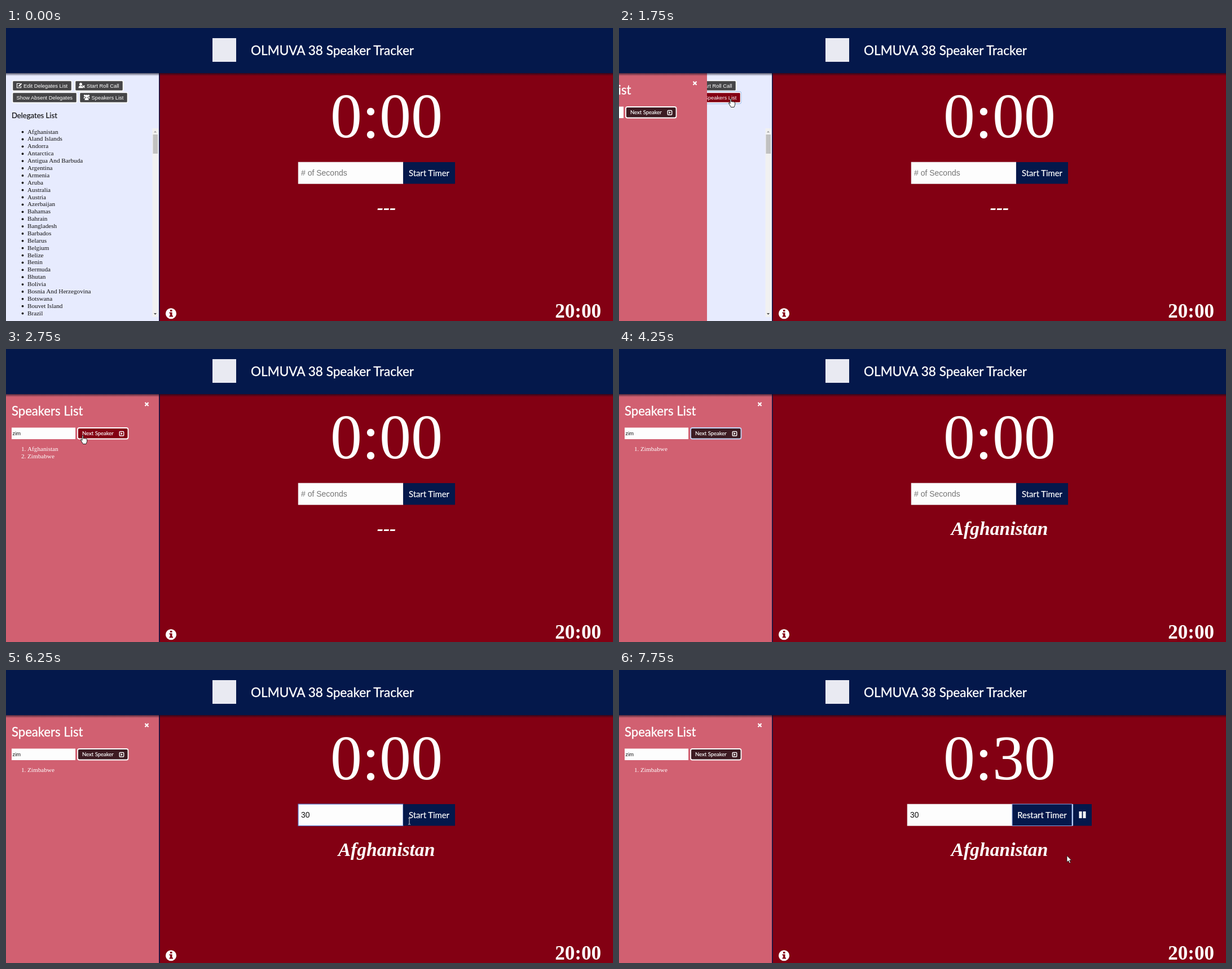
An HTML page that plays this animation: 1076 px wide and 520 px high, repeating every 8 s.

```html
<!DOCTYPE html>
<html lang="en">
<head>
<meta charset="utf-8">
<title>Speaker Tracker</title>
<style>
  html, body { margin: 0; width: 100%; height: 100%; overflow: hidden; background: #830013; }
  svg { display: block; width: 1076px; height: 520px; }
  text { white-space: pre; }
  .head { font-family: Lato, sans-serif; stroke-width: .015em; }
  .white { fill: #fff; stroke: #fff; }
  .dark { fill: #111; stroke: #111; }
  .ui { font: 9.4px "Liberation Sans", Arial, sans-serif; }
  .field { font: 14px "Liberation Sans", Arial, sans-serif; }
  .list { font: 11.2px "Liberation Serif", Times, serif; }
  .clock { font: 112px "Liberation Serif", Times, serif; fill: #fff; }
  .total { font: bold 35px "Liberation Serif", Times, serif; fill: #fff; }
  .name { font: italic bold 33.6px "Liberation Serif", Times, serif; fill: #fff; }
  .btn { fill: #454547; stroke: #fff; stroke-width: 1.5px; }
  .hot { fill: #830013; }
  .mid { text-anchor: middle; }
  .end { text-anchor: end; }
  .icon { fill: #fff; stroke: none; }
  .line { fill: none; stroke: #fff; }
</style>
</head>
<body>
<svg viewBox="0 0 1076 520" xmlns="http://www.w3.org/2000/svg">
  <defs>
    <linearGradient id="shade" x2="0" y2="1">
      <stop offset="0" stop-color="#0a0a20" stop-opacity=".65"/>
      <stop offset="1" stop-color="#0a0a20" stop-opacity="0"/>
    </linearGradient>
    <clipPath id="side"><path d="M0 80H271V520H0z"/></clipPath>
  </defs>

  <rect width="1076" height="520" fill="#830013"/>

  <!-- timer -->
  <text id="clock" class="clock mid" x="674.5" y="194">0:00</text>
  <g id="form">
    <rect id="field" x="518" y="238" width="186" height="38.5" fill="#fdfdfd"/>
    <text id="seconds" class="field" x="523" y="262"></text>
    <rect id="start" x="704" y="238" width="92" height="38.5" fill="#04184b"/>
    <text id="startText" class="head white mid" font-size="14.8" x="750" y="262.5">Start Timer</text>
    <g id="pause">
      <rect x="812" y="238" width="33" height="38.5" fill="#04184b"/>
      <path d="M811 238V276.5" stroke="#b9cdf2" stroke-width="2"/>
      <path class="icon" d="M822.5 251h5v12h-5zM829.5 251h5v12h-5z"/>
    </g>
  </g>
  <text id="speaker" class="name mid" x="674.5" y="329.5">---</text>
  <text class="total end" x="1055" y="514">20:00</text>
  <circle cx="292.5" cy="506.8" r="9.5" fill="#fff"/>
  <path fill="#830013" d="M291 500h3.5v3h-3.5zM289.5 504.5h5v6h1.5v2h-6.5v-2h1.5v-4h-1.5z"/>

  <!-- delegates -->
  <rect y="80" width="271" height="440" fill="#e7ebfe"/>
  <g class="ui" fill="#fff">
    <rect class="btn" x="11.5" y="93.5" width="105" height="18" rx="2"/>
    <text x="31" y="105.5">Edit Delegates List</text>
    <path class="line" stroke-width="1.2" d="M25 98.5h-5.5v7.5h7v-3"/>
    <path class="line" stroke-width="2" d="M22.5 103.5l5-5"/>
    <rect class="btn" x="122.5" y="93.5" width="85" height="18" rx="2"/>
    <text x="143" y="105.5">Start Roll Call</text>
    <path class="icon" d="M128.5 106.5q0-4 3.5-4t4.5 4z"/>
    <circle cx="132.5" cy="99.8" r="2.5"/>
    <path class="line" stroke-width="1.5" d="M135.5 102l4 4m0-4l-4 4"/>
    <rect class="btn" x="11.5" y="114.5" width="114" height="18" rx="2"/>
    <text x="18.5" y="126.5">Show Absent Delegates</text>
    <rect id="openFocus" x="129.7" y="112.8" width="87" height="21.5" rx="3" fill="none" stroke="#8fb4e6"/>
    <rect id="open" class="btn" x="130.5" y="114.5" width="85" height="18" rx="2"/>
    <text x="151.5" y="126.5">Speakers List</text>
    <g class="icon">
      <circle cx="143" cy="121" r="2.5"/><circle cx="139.5" cy="120" r="1.7"/><circle cx="146.5" cy="120" r="1.7"/>
      <path d="M139.5 128q0-4.500 3.500-4.500t3.500 4.500zM137.500 125q0-3 3-3l-1 3zM148.500 125q0-3-3-3l1 3z"/>
    </g>
  </g>
  <text class="head dark" font-size="13.1" x="10" y="160">Delegates List</text>
  <g id="delegates" class="list" fill="#111"></g>
  <rect x="259.5" y="178" width="10.5" height="335" fill="#f1f1f1"/>
  <rect x="260.5" y="189" width="8.5" height="34" fill="#c1c1c1"/>
  <path fill="#a3a3a3" d="M262 185.500h5l-2.500-3z"/>
  <path fill="#505050" d="M262 506h5l-2.500 3z"/>

  <!-- speakers -->
  <g clip-path="url(#side)">
    <g id="panel">
      <rect y="80" width="271" height="440" fill="#d16071"/>
      <text class="head white" font-size="22.1" x="10" y="118">Speakers List</text>
      <path class="line" stroke-width="2.2" d="M246.5 95l6 6m0-6l-6 6"/>
      <rect x="10" y="139.5" width="113" height="20.5" fill="#fdfdfd"/>
      <text id="query" class="ui" x="11.5" y="152.8" fill="#111"></text>
      <rect id="next" x="127" y="140" width="89.5" height="19.5" rx="3" stroke-width="1.8"/>
      <text class="head white" font-size="9.5" x="135" y="153">Next Speaker</text>
      <rect class="line" x="201.2" y="146.5" width="7.5" height="7.5" rx="1" stroke-width="1.4"/>
      <path class="icon" d="M203.500 148l3.500 2.200-3.500 2.200z"/>
      <g id="queue" class="list" fill="#fff"></g>
    </g>
  </g>
  <rect x="271" y="80" width="1.8" height="440" fill="#1b1442"/>

  <!-- header -->
  <rect y="80" width="1076" height="5" fill="url(#shade)"/>
  <rect width="1076" height="80" fill="#04184b"/>
  <rect x="366" y="18" width="42" height="42" fill="#e9eaf2"/>
  <text class="head white" font-size="22.6" x="434" y="48">OLMUVA 38 Speaker Tracker</text>

  <!-- pointers, tip at the origin -->
  <path id="arrow" fill="#fff" stroke="#111" stroke-width=".8" d="M0 0v11.500l2.600-2.400 1.900 4.200 2-.9-1.900-4.100h3.600z"/>
  <path id="hand" fill="#fff" stroke="#111" stroke-width=".9" stroke-linejoin="round"
    d="M-1 1q1-1.800 2 0v5l1-.8 1.300 1 1.200-.6 1.200 1 1.300-.3.600 1v4l-1.600 4.200h-5.500l-3.800-6.500q-.6-2 1-1.300l1.300 1.500z"/>
  <path id="beam" fill="none" d="M-2-5.500h1.500l.5.500.5-.5h1.500M0-5v10M-2 5.500h1.500l.5-.5.5.5h1.500"/>
</svg>
<script>
const LOOP = 8000, STEP = 250;
const $ = id => document.getElementById(id);
const show = (id, on) => $(id).style.display = on ? '' : 'none';
const attrs = (id, values) => {
  for (const key in values) $(id).setAttribute(key, values[key]);
};

const countries = ['Afghanistan', 'Aland Islands', 'Andorra', 'Antarctica', 'Antigua And Barbuda',
  'Argentina', 'Armenia', 'Aruba', 'Australia', 'Austria', 'Azerbaijan', 'Bahamas', 'Bahrain',
  'Bangladesh', 'Barbados', 'Belarus', 'Belgium', 'Belize', 'Benin', 'Bermuda', 'Bhutan', 'Bolivia',
  'Bosnia And Herzegovina', 'Botswana', 'Bouvet Island', 'Brazil'];
const rowGap = 12.88;
$('delegates').innerHTML = countries.map((name, i) => {
  const y = 187.6 + i * rowGap;
  return `<circle cx="29.5" cy="${y - 3}" r="1.9"/><text x="38" y="${y}">${name}</text>`;
}).join('');

// Each track holds its value until the next time.
const tracks = {
  panel: [[0, -271], [1750, -115], [2000, 0]],
  query: [[0, ''], [2250, 'afg'], [2500, 'zim']],
  queue: [[0, []], [2250, ['Afghanistan']], [2500, ['Afghanistan', 'Zimbabwe']], [3250, ['Zimbabwe']]],
  pointer: [
    [0, null], [750, ['arrow', 717, 290]], [1000, ['arrow', 480, 215]], [1250, ['arrow', 262, 150]],
    [1500, ['hand', 198, 125]], [2000, ['arrow', 150, 140]], [2250, null],
    [2750, ['hand', 136, 153]], [3750, ['arrow', 250, 190]], [4000, ['arrow', 420, 240]],
    [4250, null], [4500, ['beam', 600, 264]], [4750, ['beam', 570, 262]], [5500, null],
    [6000, ['beam', 650, 264]], [6250, ['beam', 715, 268.5]], [6500, ['hand', 738, 262]],
    [7500, ['arrow', 780, 305]], [7750, ['arrow', 794, 329.5]]
  ]
};
const at = (track, t) => tracks[track].filter(([time]) => time <= t).pop()[1];

function drawPointer(pointer) {
  ['arrow', 'hand', 'beam'].forEach(kind => show(kind, pointer && pointer[0] === kind));
  if (!pointer) return;
  const [kind, x, y] = pointer;
  attrs(kind, { transform: `translate(${x} ${y})` });
  if (kind === 'beam') attrs(kind, { stroke: x > 704 ? '#ddd' : '#222' });
}

function drawTimer(t) {
  const running = t >= 7250, typed = t >= 5500;
  const focused = t >= 5000 && t < 7000;
  $('clock').textContent = running ? '0:30' : '0:00';
  $('seconds').textContent = typed ? '30' : '# of Seconds';
  attrs('seconds', { fill: typed ? '#111' : '#757575' });
  attrs('field', { stroke: focused ? '#5b79c9' : '#d5c4c8', 'stroke-width': focused ? 1.2 : .6 });
  attrs('form', { transform: `translate(${running ? -7 : 0} 0)` });
  attrs('start', { width: running ? 106 : 92, stroke: t >= 7000 ? '#86a6e6' : 'none' });
  attrs('startText', { x: running ? 757 : 750 });
  $('startText').textContent = running ? 'Restart Timer' : 'Start Timer';
  show('pause', running);
  $('speaker').textContent = t >= 3250 ? 'Afghanistan' : '---';
}

function drawPanel(t) {
  attrs('panel', { transform: `translate(${at('panel', t)} 0)` });
  $('query').textContent = at('query', t);
  $('queue').innerHTML = at('queue', t).map((name, i) => {
    const y = 181.3 + i * rowGap;
    return `<text x="27" y="${y}">${i + 1}.</text><text x="38" y="${y}">${name}</text>`;
  }).join('');
  const hover = t >= 2750 && t < 3750, focus = t >= 3250 && t < 5000;
  attrs('next', { fill: hover ? '#830013' : '#3d1b22', stroke: focus ? '#c3d6f7' : '#fff' });
}

function draw(t) {
  drawTimer(t);
  drawPanel(t);
  $('open').classList.toggle('hot', t >= 1500 && t < 2000);
  show('openFocus', t >= 1750);
  drawPointer(at('pointer', t));
}

let shown = -1;
const begin = performance.now();
function tick() {
  const elapsed = Math.max(0, performance.now() - begin) % LOOP;
  const t = Math.floor(elapsed / STEP) * STEP;
  if (t !== shown) draw(shown = t);
  requestAnimationFrame(tick);
}
tick();
</script>
</body>
</html>
```
